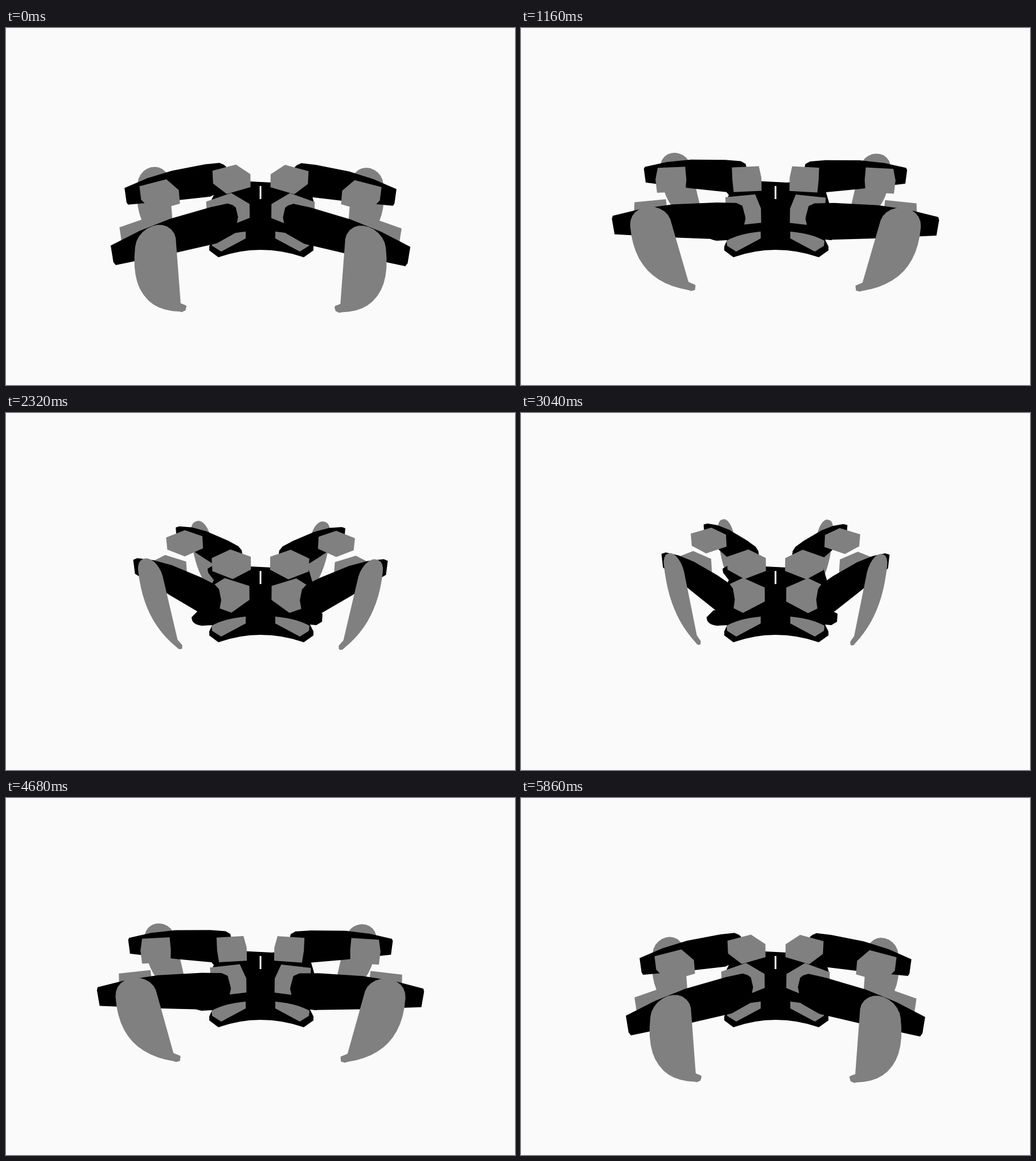
Write an HTML page with a canvas that moves like this. It is 894 by 626 pixels and loops after 5.88 s.

```html
<!DOCTYPE html>
<html lang="en">
<head>
<meta charset="utf-8">
<title>Walking robot</title>
<style>
html, body { margin: 0; width: 100%; height: 100%; overflow: hidden; background: #fafafa; }
canvas { display: block; }
</style>
</head>
<body>
<canvas id="stage" width="894" height="626"></canvas>
<script>
const ctx = document.getElementById('stage').getContext('2d');
const GRAY = '#808080', BLACK = '#000', BACK = '#fafafa';
const LOOP = 5880;
const HIP_X = 57, HIP_TURN = 0.09;

// face: the side of the leg that carries thigh and claw (1 = towards the viewer).
const FRONT = { y: 0, face: 1, reach: 1, turn: 0, knee: 158 };
const REAR = { y: -126, face: -1, reach: 0.93, turn: -0.1, knee: 147 };

// Side views of the leg parts as [distance from hip, height].
const THIGH = [[5, -30], [-2, 0], [2, 20], [12, 26], [45, 29], [118, 30],
  [170, 25], [218, 15], [218, -15], [118, -29], [42, -38]];
const CLAW_TIP = [[98, -114], [86, -121], [87, -129], [94, -131], [112, -121]];
const CLAW_CENTRE = [155, 6], CLAW_RADIUS = 33;
const CLAW = clawOutline();

const BODY = [428,269, 467,271, 526,266, 531,272, 541,306, 545,346, 556,352, 555,366,
  545,372, 534,371, 540,383, 540,390, 523,402, 486,389, 447,389, 410,389, 373,402,
  357,390, 357,383, 362,372, 344,373, 326,371, 326,358, 338,346, 357,345, 360,303,
  365,293, 355,280, 354,273, 366,266];
const BODY_CMD = 'M' + 'L'.repeat(12) + 'QQLLLLQ' + 'L'.repeat(7);
const WEDGE = [361,373, 385,360, 421,357, 421,369, 378,392, 362,382];

// A round head followed by a curved back edge that runs down to the tip.
function clawOutline() {
  const [cr, cz] = CLAW_CENTRE, pts = [];
  for (let i = 0; i <= 12; i++) {
    const a = Math.PI * i / 12;
    pts.push([cr + CLAW_RADIUS * Math.cos(a), cz + CLAW_RADIUS * Math.sin(a)]);
  }
  for (let i = 1; i <= 12; i++) {
    const s = i / 12, q = 1 - s;
    pts.push([188 * q * q + 380 * s * q + 98 * s * s, 6 * q * q - 210 * s * q - 129 * s * s]);
  }
  pts.push([98, -114]);
  return pts;
}

// Perspective view from above the front: x right, y towards the viewer, z up.
function project(x, y, z) {
  const m = 1 / (1 - 0.00095 * y - 0.000525 * z);
  return [447 + m * x, 320 + m * (0.483 * y - 0.875 * z + 0.004 * x)];
}

function hull(pts) {
  pts.sort((a, b) => a[0] - b[0] || a[1] - b[1]);
  const chain = list => {
    const out = [];
    for (const p of list) {
      while (out.length > 1) {
        const [a, b] = out.slice(-2);
        if ((b[0] - a[0]) * (p[1] - a[1]) > (b[1] - a[1]) * (p[0] - a[0])) break;
        out.pop();
      }
      out.push(p);
    }
    return out.slice(0, -1);
  };
  return [...chain(pts), ...chain([...pts].reverse())];
}

function drawPath(cmd, pts, color) {
  let i = 0;
  const take = n => pts.slice(i, i += 2 * n);
  ctx.beginPath();
  for (const c of cmd) {
    if (c === 'M') ctx.moveTo(...take(1));
    else if (c === 'L') ctx.lineTo(...take(1));
    else ctx.quadraticCurveTo(...take(2));
  }
  ctx.closePath();
  ctx.fillStyle = color;
  ctx.fill();
}

function drawSolid(pts, color) {
  const outline = hull(pts);
  drawPath('M' + 'L'.repeat(outline.length - 1), outline.flat(), color);
}

// Maps leg coordinates (along, across, up) to the stage; dir is -1 left, 1 right.
function placer(leg, dir, yaw) {
  const c = Math.cos(yaw + leg.turn), s = Math.sin(yaw + leg.turn);
  return (r, t, z) =>
    project(dir * (HIP_X + r * c - t * s), leg.y + r * s + t * c, z);
}

function drawBox(leg, dir, yaw, r) {
  const place = placer(leg, dir, yaw), pts = [];
  const c = 27 * Math.cos(HIP_TURN), s = 27 * Math.sin(HIP_TURN);
  for (const a of [-1, 1]) for (const b of [-1, 1]) for (const z of [-13, 15])
    pts.push(place(r + a * c - b * s, a * s + b * c, z));
  drawSolid(pts, GRAY);
}

function drawPlate(leg, dir, yaw, profile, offset, half, color) {
  const place = placer(leg, dir, yaw);
  drawSolid(profile.flatMap(([r, z]) => [-half, half].map(
    d => place(r * leg.reach, leg.face * offset + d, z))), color);
}

function drawThigh(leg, dir, yaw) {
  drawPlate(leg, dir, yaw, THIGH, 25, 5, BLACK);
}

// The claw stretches a little while the leg reaches forwards.
function drawClaw(leg, dir, yaw) {
  const bend = 0.35 * Math.max(0, yaw), c = Math.cos(bend), s = Math.sin(bend);
  const [cr, cz] = CLAW_CENTRE;
  const turn = ([r, z]) =>
    [cr + (r - cr) * c - (z - cz) * s, cz + (r - cr) * s + (z - cz) * c];
  for (const shape of [CLAW, CLAW_TIP])
    drawPlate(leg, dir, yaw, shape.map(turn), 42, 2, GRAY);
}

// Steady progress there and back, slightly hurried before the far end.
function progress(t) {
  if (t < 1820) return t + 40;
  if (t < 2400) return 1860 + (t - 1820) * 716 / 580;
  if (t < 2832) return t + 176;
  return Math.abs(5840 - t);
}

function draw(t) {
  const a = (progress(t) - 1420) / 1250;
  const yaw = -0.01 - 0.8 * Math.sin(a) - 0.2 * (1 - Math.cos(a));
  const both = (part, leg, r) => [-1, 1].forEach(dir => part(leg, dir, yaw, r));

  ctx.fillStyle = BACK;
  ctx.fillRect(0, 0, 894, 626);
  both(drawClaw, REAR);
  both(drawThigh, REAR);
  drawPath(BODY_CMD, BODY, BLACK);
  both(drawBox, REAR, 0);
  both(drawBox, FRONT, FRONT.knee);
  both(drawBox, REAR, REAR.knee);
  both(drawBox, FRONT, 0);
  drawPath('MQLLL', WEDGE, GRAY);
  drawPath('MQLLL', WEDGE.map((v, i) => i % 2 ? v : 894 - v), GRAY);
  both(drawThigh, FRONT);
  both(drawClaw, FRONT);
  ctx.fillStyle = BACK;
  ctx.fillRect(445.5, 277, 3, 23);
}

const start = performance.now();
function tick() {
  draw(Math.floor((performance.now() - start) % LOOP / 20) * 20);
  requestAnimationFrame(tick);
}
tick();
</script>
</body>
</html>
```
